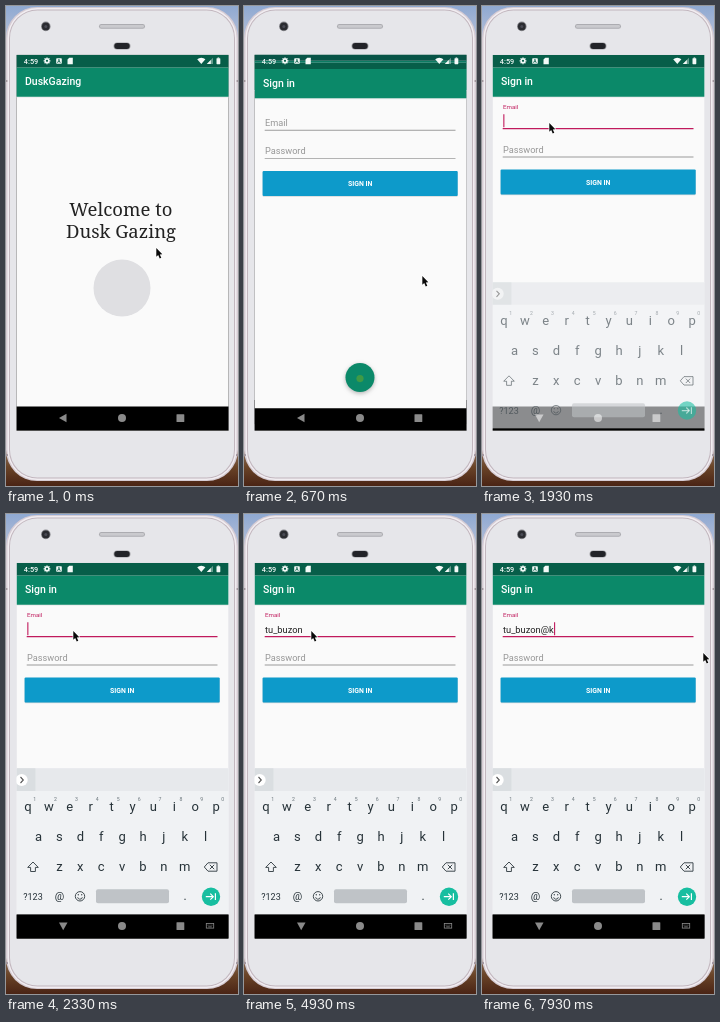
Recreate the animation shown at these times as an HTML page with a canvas. Size 232x480 px, loop 8000 ms.

```html
<!DOCTYPE html>
<html lang="en">
<head>
<meta charset="utf-8">
<title>Phone sign-in</title>
<style>
html, body { margin: 0; width: 100%; height: 100%; overflow: hidden; background: #cfc4cc; }
canvas { display: block; width: 232px; height: 480px; }
</style>
</head>
<body>
<canvas id="stage"></canvas>
<script>
const W = 232, H = 480, LOOP = 8000;
const SCREEN = { x: 10.4, y: 48.7, w: 212.3, h: 376.1 };
const BOTTOM = SCREEN.y + SCREEN.h;
const GREEN = '#0b8969', DARK_GREEN = '#075e49', PINK = '#c01a5c', PAPER = '#fafafa', KEY = '#263238';
const SANS = 'Roboto, sans-serif', SERIF = '"Noto Serif", serif';
const APP = 'DuskGazing', APP_TITLE = 'Dusk Gazing';

const canvas = document.getElementById('stage');
const ctx = canvas.getContext('2d');
const dpr = window.devicePixelRatio || 1;
canvas.width = W * dpr;
canvas.height = H * dpr;

// [time, x, y] of the pointer tip
const POINTER = [
  [0, 150, 242], [400, 150, 242], [470, 157.5, 251], [670, 178, 270], [850, 183, 273],
  [1200, 70, 120], [1270, 67, 117], [5620, 67, 117], [5670, 84, 130], [5730, 118, 147],
  [5800, 170, 157], [5870, 221, 139], [8000, 221, 139]
];
// [time, characters typed]
const TYPED = [[3070, 1], [3600, 2], [3670, 3], [3800, 4], [3930, 5], [4130, 6], [4330, 7], [4470, 8], [5070, 10]];
const MAIL = 'tu_buzon@k';
const CARET_OFF = [[2470, 3000], [3570, 3670], [4930, 5070], [5530, 6070], [6530, 7930]];

const clamp = v => Math.max(0, Math.min(1, v));
const mix = (a, b, p) => a + (b - a) * p;
const span = (t, start, length) => clamp((t - start) / length);

// One cubic Bezier segment, solved for y at x
function bezier(x, x0, y0, x1, y1, x2, y2, x3, y3) {
  const at = (u, a, b, c, d) =>
    (1 - u) ** 3 * a + 3 * (1 - u) ** 2 * u * b + 3 * (1 - u) * u * u * c + u ** 3 * d;
  let lo = 0, hi = 1;
  for (let i = 0; i < 24; i++) {
    const mid = (lo + hi) / 2;
    if (at(mid, x0, x1, x2, x3) < x) lo = mid; else hi = mid;
  }
  return at(lo, y0, y1, y2, y3);
}
const standardEase = p => bezier(p, 0, 0, 0.4, 0, 0.2, 1, 1, 1);
const revealEase = p => p < 1 / 6
  ? bezier(p, 0, 0, 0.05, 0, 0.1333, 0.06, 1 / 6, 0.4)
  : bezier(p, 1 / 6, 0.4, 0.2083, 0.82, 0.25, 1, 1, 1);

function rect(x, y, w, h, fill, r = 0) {
  ctx.fillStyle = fill;
  ctx.beginPath();
  ctx.roundRect(x, y, w, h, r);
  ctx.fill();
}
// Full-width stripe of the screen
const band = (top, bottom, fill) => rect(SCREEN.x, top, SCREEN.w, bottom - top, fill);

function disc(x, y, r, fill) {
  ctx.fillStyle = fill;
  ctx.beginPath();
  ctx.arc(x, y, r, 0, Math.PI * 2);
  ctx.fill();
}

function path(points, fill, stroke, width = 1, close = true) {
  ctx.beginPath();
  points.forEach(([x, y], i) => i ? ctx.lineTo(x, y) : ctx.moveTo(x, y));
  if (close) ctx.closePath();
  if (stroke) {
    ctx.strokeStyle = stroke;
    ctx.lineWidth = width;
    ctx.stroke();
  }
  if (fill) {
    ctx.fillStyle = fill;
    ctx.fill();
  }
}
const line = (points, stroke, width) => path(points, null, stroke, width, false);

function text(str, x, y, size, fill, { align = 'left', weight = 400, family = SANS } = {}) {
  ctx.font = `${weight} ${size}px ${family}`;
  ctx.textAlign = align;
  ctx.fillStyle = fill;
  ctx.fillText(str, x, y);
  return ctx.measureText(str).width;
}
const center = (str, x, y, size, fill, weight = 400) =>
  text(str, x, y, size, fill, { align: 'center', weight });

function drawPhone() {
  const sky = ctx.createLinearGradient(0, 0, 0, H);
  [[0, '#8fa9d2'], [0.08, '#bcc3d8'], [0.4, '#d8d0d9'], [0.9, '#a89688'], [0.96, '#6a4428'], [1, '#4a2415']]
    .forEach(([p, c]) => sky.addColorStop(p, c));
  ctx.fillStyle = sky;
  ctx.fillRect(0, 0, W, H);

  rect(0, 1, 232, 474, '#d6ccd4', 31);
  for (const y of [74, 448]) {
    rect(0, y, 3, 2, '#a3979e');
    rect(229, y, 3, 2, '#a3979e');
  }
  rect(1.5, 2, 229, 472, '#f1edf1', 30);
  rect(3, 3.5, 226, 469, '#c2b6be', 28.5);
  rect(4, 4.5, 224, 467, '#e6e6ea', 27.5);

  disc(39.8, 20.4, 4.8, '#8b8b90');
  disc(39.8, 20.4, 3.9, '#2b2c31');
  disc(39.8, 20.4, 1.5, '#4a4b55');
  rect(93, 18, 46, 4.8, '#acacb1', 2.4);
  rect(94, 19.1, 44, 2.6, '#cacace', 1.3);
  rect(107.5, 36.6, 17, 7, '#a0a0a5', 3.5);
  rect(108.3, 37.1, 15.4, 6, '#222328', 3);
}

// Bars shared by both pages
function drawPage(title) {
  band(SCREEN.y, BOTTOM, PAPER);
  band(90.6, 91.6, '#e3e6e5');
  band(61.4, 90.7, GREEN);
  band(SCREEN.y, 61.4, DARK_GREEN);
  text(title, 19, 79.3, 10.5, '#fff', { weight: 500 });
  band(400.6, BOTTOM, '#000');
}

function drawWelcome() {
  drawPage(APP);
  const style = { align: 'center', family: SERIF };
  text('Welcome to', 114.8, 209.6, 18.5, '#222', style);
  text(APP_TITLE, 115, 231.6, 18.5, '#222', style);
  disc(116, 282, 28.5, '#dfdfe2');
}

function typedAt(t) {
  let n = 0;
  for (const [time, count] of TYPED) if (t >= time) n = count;
  return MAIL.slice(0, n);
}

function drawSignIn(t) {
  drawPage('Sign in');
  const focus = standardEase(span(t, 1300, 200));
  const focused = t >= 1300;
  text('Email', 21, mix(118.5, 103, focus), mix(9.2, 6.2, focus), focused ? PINK : '#979797');
  if (focused) rect(20.7, 122, 190.8, 1.3, PINK);
  else rect(20.7, 122.3, 190.8, 0.8, '#9b9b9b');

  text('Password', 21, 146.8, 9.2, '#979797');
  rect(20.7, 150.6, 190.8, 0.8, '#9b9b9b');

  rect(18.6, 164, 195.1, 25.2, '#d3d7d9', 1);
  rect(18.6, 163.5, 195.1, 25, '#0d9aca', 1);
  center('SIGN IN', 116.2, 178.5, 6.9, '#fff', 700);

  const typed = typedAt(t);
  const width = typed ? text(typed, 21, 118.6, 9.3, '#222') : 0;
  if (typed && typed.length < 3) rect(21, 119.6, width, 0.7, '#333');
  const hidden = CARET_OFF.some(([a, b]) => t >= a && t < b);
  if (t >= 1500 && !hidden) rect(21.3 + width, 108.3, 1.1, 13, PINK);

  const size = 1 - standardEase(span(t, 1480, 220));
  if (size > 0) {
    ctx.save();
    ctx.translate(116, 370);
    ctx.scale(size, size);
    ctx.shadowColor = 'rgba(0,0,0,.28)';
    ctx.shadowBlur = 4 * dpr;
    ctx.shadowOffsetY = 1.5 * dpr;
    disc(0, 0, 14.5, GREEN);
    ctx.shadowColor = 'transparent';
    disc(0, 1, 3.6, '#3f9a45');
    ctx.restore();
  }
}

function keyRow(keys, x, y) {
  [...keys].forEach((k, i) => center(k, x + i * 20.9, y, 13, KEY));
}

function drawKeyboard(t) {
  const ink = '#414b50';
  band(254.3, 400.6, '#f0f2f4');
  band(254.3, 277, '#e7e9ec');
  rect(SCREEN.x, 254.3, 19, 22.7, '#dadee1');
  disc(15.7, 266, 6, '#fff');
  line([[14.5, 263], [17.3, 266], [14.5, 269]], '#555', 1.1);
  const typed = typedAt(t);
  if (typed.length < 3) center(typed, 116, 269.3, 9.5, '#6b757a');

  keyRow('qwertyuiop', 22, 297.3);
  [...'1234567890'].forEach((k, i) => center(k, 28.6 + i * 20.9, 287, 5.2, '#6b767c'));
  keyRow('asdfghjkl', 32.5, 327.3);
  keyRow('zxcvbnm', 53.4, 357.3);

  path([[27, 348], [32.3, 353.4], [29.4, 353.4], [29.4, 357.5], [24.6, 357.5], [24.6, 353.4], [21.7, 353.4]], null, ink, 1);
  path([[198.3, 353], [202, 348.8], [211, 348.8], [211, 357.2], [202, 357.2]], null, ink, 1);
  line([[203.8, 350.8], [208.2, 355.2]], ink, 1);
  line([[208.2, 350.8], [203.8, 355.2]], ink, 1);

  center('?123', 27, 386, 9, KEY);
  center('@', 53.4, 386, 10.5, KEY);
  ctx.strokeStyle = ink;
  ctx.lineWidth = 1;
  ctx.beginPath();
  ctx.arc(74, 382.3, 4.7, 0, Math.PI * 2);
  ctx.stroke();
  ctx.beginPath();
  ctx.arc(74, 382.8, 2.4, 0.2, Math.PI - 0.2);
  ctx.stroke();
  disc(72.3, 380.8, 0.7, ink);
  disc(75.7, 380.8, 0.7, ink);
  rect(90, 375.3, 73, 14, '#bfc3c7', 2);
  center('.', 179, 386, 12, KEY);

  disc(205, 382.7, 9.2, '#17bea0');
  line([[199.8, 382.7], [207, 382.7]], '#fff', 1.2);
  line([[204.3, 379.7], [207.3, 382.7], [204.3, 385.7]], '#fff', 1.2);
  line([[209.4, 379.3], [209.4, 386.1]], '#fff', 1.2);
  band(400.6, BOTTOM, '#000');
}

function drawStatusIcons() {
  const white = '#f4faf8';
  text('4:59', 17.8, 57.6, 7.3, white, { weight: 500 });
  for (let i = 0; i < 4; i++) {
    const a = i * Math.PI / 4, dx = Math.cos(a) * 3.4, dy = Math.sin(a) * 3.4;
    line([[41 - dx, 54.8 - dy], [41 + dx, 54.8 + dy]], white, 1.3);
  }
  disc(41, 54.8, 2.5, white);
  disc(41, 54.8, 1.1, DARK_GREEN);
  rect(50.2, 52.2, 5.6, 5.6, white, 0.8);
  center('A', 53, 56.8, 5, DARK_GREEN, 700);
  path([[63.3, 51.7], [66.8, 51.7], [66.8, 58.2], [61.5, 58.2], [61.5, 53.5]], white);

  ctx.fillStyle = white;
  ctx.beginPath();
  ctx.moveTo(195.3, 58);
  ctx.arc(195.3, 58, 6.2, -Math.PI * 0.73, -Math.PI * 0.27);
  ctx.fill();
  path([[207, 51.8], [207, 58], [200.8, 58]], 'rgba(244,250,248,.4)');
  path([[204.8, 54], [204.8, 58], [200.8, 58]], white);
  rect(210.5, 52.2, 3.8, 6, white, 0.6);
  rect(211.6, 51.4, 1.6, 1.2, white);
}

function drawNavIcons(t) {
  const gray = 'rgba(255,255,255,.54)';
  if (t >= 1925) {
    path([[53, 408.5], [61.5, 408.5], [57.2, 416.3]], gray);
  } else {
    path([[60.5, 407.8], [60.5, 416.2], [53, 412]], gray);
  }
  disc(116, 412, 4, gray);
  rect(170.5, 408.2, 7.8, 7.8, gray, 0.6);
  if (t >= 2000) {
    ctx.strokeStyle = gray;
    ctx.lineWidth = 0.8;
    ctx.strokeRect(200.3, 409.5, 7.4, 4.6);
    for (let i = 0; i < 3; i++) rect(201.6 + i * 1.9, 410.7, 1, 0.8, gray);
    rect(202.2, 412.4, 3.6, 0.8, gray);
  }
}

function drawPointer(t) {
  const i = Math.max(1, POINTER.findIndex(p => p[0] > t));
  const [t0, x0, y0] = POINTER[i - 1], [t1, x1, y1] = POINTER[i];
  const p = span(t, t0, t1 - t0);
  ctx.save();
  ctx.translate(mix(x0, x1, p), mix(y0, y1, p));
  ctx.lineJoin = 'round';
  path([[0.3, 0], [0.3, 8.8], [2.2, 7.1], [3.7, 10.5], [5.3, 9.8], [3.8, 6.5], [6.3, 6.3]], '#0a0a0a', '#fff', 1.3);
  ctx.restore();
}

function draw(t) {
  ctx.setTransform(dpr, 0, 0, dpr, 0, 0);
  drawPhone();

  ctx.save();
  ctx.beginPath();
  ctx.rect(SCREEN.x, SCREEN.y, SCREEN.w, SCREEN.h);
  ctx.clip();

  const opening = span(t, 402.4, 425);
  const moved = standardEase(opening);
  if (opening < 1) {
    ctx.save();
    band(SCREEN.y, BOTTOM, '#000');
    ctx.translate(0, -7.4 * moved);
    drawWelcome();
    ctx.restore();
    band(SCREEN.y, BOTTOM, `rgba(20,0,50,${0.1 * span(t, 402, 68)})`);
  }
  if (opening > 0) {
    const shown = SCREEN.h * revealEase(opening);
    ctx.save();
    ctx.beginPath();
    ctx.rect(SCREEN.x, BOTTOM - shown, SCREEN.w, shown);
    ctx.clip();
    ctx.translate(0, 15.4 * (1 - moved));
    drawSignIn(t);
    ctx.restore();
  }
  if (t >= 1925) {
    const p = span(t, 1880, 220);
    ctx.save();
    ctx.globalAlpha = clamp(p * 2.5);
    ctx.translate(0, 37 * (1 - p) ** 2);
    drawKeyboard(t);
    ctx.restore();
  }
  drawStatusIcons();
  drawNavIcons(t);
  ctx.restore();
  drawPointer(t);
}

function tick() {
  draw(performance.now() % LOOP);
  requestAnimationFrame(tick);
}
tick();
</script>
</body>
</html>
```
